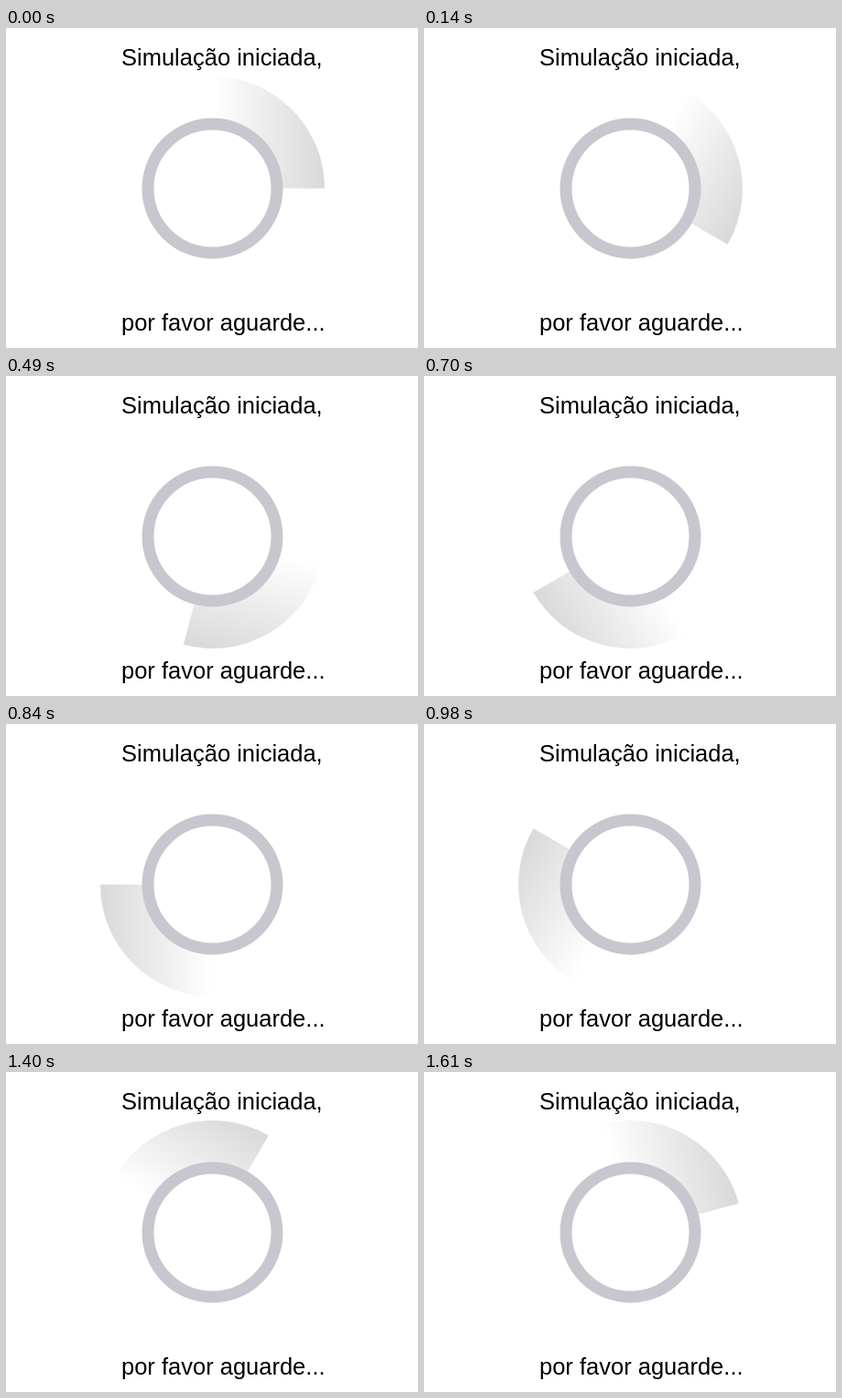
These frames come from a looping animation (450x350 px, 1.68 s). An HTML page with a canvas:

```html
<!DOCTYPE html>
<html lang="pt">
<head>
<meta charset="utf-8">
<style>
  html, body { margin: 0; width: 100%; height: 100%; overflow: hidden; background: #fff; }
  canvas { display: block; }
</style>
</head>
<body>
<canvas id="stage" width="450" height="350"></canvas>
<script>
const ctx = document.getElementById("stage").getContext("2d");
const STEPS = 24, STEP_MS = 70;
const CX = 225.5, CY = 175.5;
const SWEEP_RADIUS = 122.5, RING_RADIUS = 70.5, RING_WIDTH = 13;

function drawSweep(angle) {
  ctx.save();
  ctx.translate(CX, CY);
  ctx.rotate(angle);
  const shade = ctx.createLinearGradient(0, 0, SWEEP_RADIUS, 0);
  shade.addColorStop(0, "#fff");
  shade.addColorStop(1, "#d9d9d9");
  ctx.fillStyle = shade;
  ctx.beginPath();
  ctx.moveTo(0, 0);
  ctx.arc(0, 0, SWEEP_RADIUS, -Math.PI / 2, 0);
  ctx.fill();
  ctx.restore();
}

function drawRing() {
  ctx.beginPath();
  ctx.arc(CX, CY, RING_RADIUS, 0, Math.PI * 2);
  ctx.fillStyle = "#fff";
  ctx.fill();
  ctx.strokeStyle = "#c7c7cf";
  ctx.lineWidth = RING_WIDTH;
  ctx.stroke();
}

function drawText() {
  ctx.fillStyle = "#000";
  ctx.font = '25.5px "Liberation Sans", Arial, sans-serif';
  ctx.fillText("Simulação iniciada,", 126, 41);
  ctx.fillText("por favor aguarde...", 126, 331);
}

function draw(now) {
  const step = Math.floor(now / STEP_MS) % STEPS;
  ctx.fillStyle = "#fff";
  ctx.fillRect(0, 0, 450, 350);
  drawSweep(step * Math.PI * 2 / STEPS);
  drawRing();
  drawText();
}

const start = performance.now();
function tick() {
  draw(performance.now() - start);
  requestAnimationFrame(tick);
}
tick();
</script>
</body>
</html>
```
